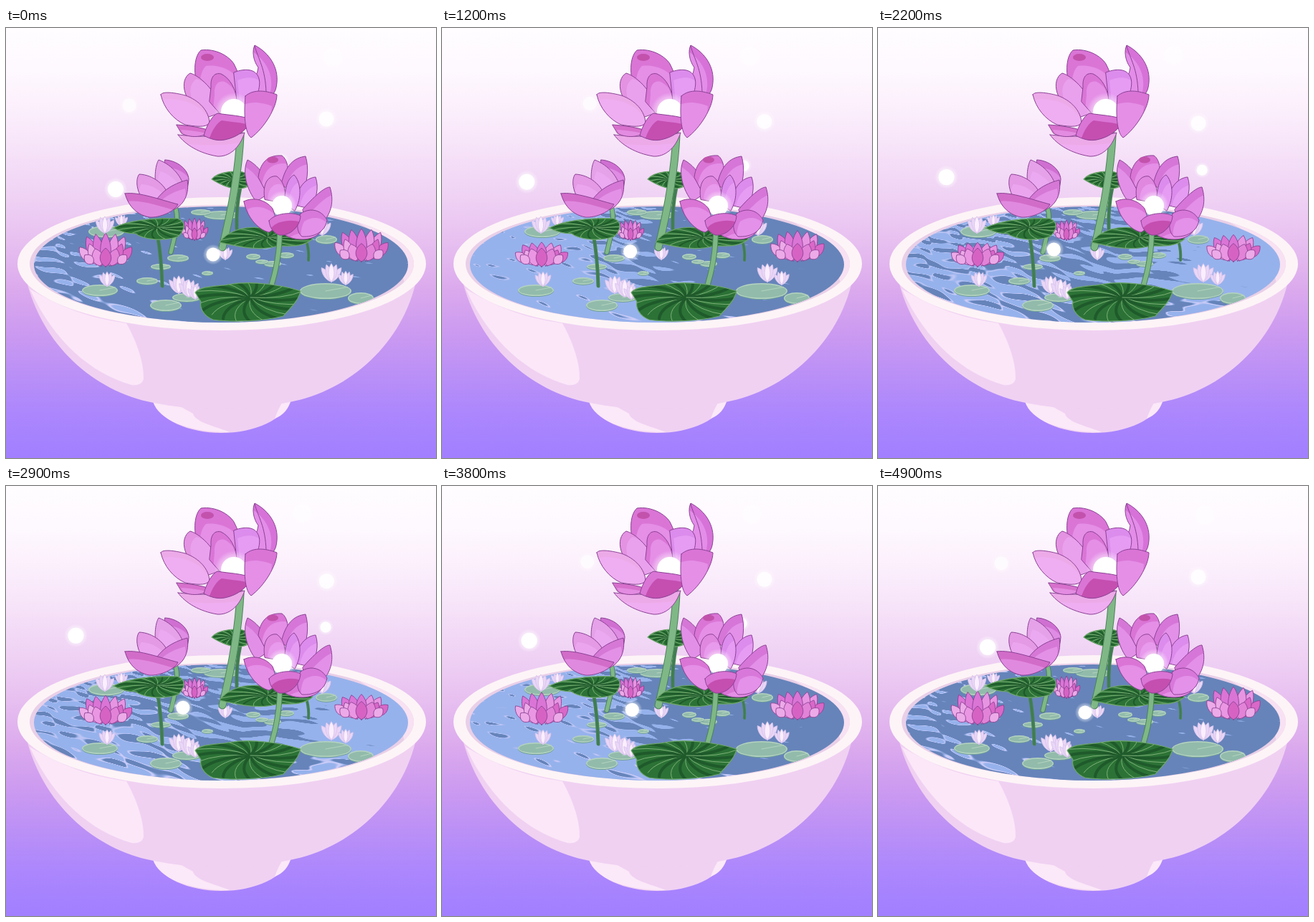
Recreate the animation shown at these times as an HTML page with a canvas. Size 600x600 px, loop 5 s.

```html
<!DOCTYPE html>
<html lang="en">
<head>
<meta charset="utf-8">
<title>Lotus bowl</title>
<style>
html, body { margin: 0; width: 100%; height: 100%; overflow: hidden; }
canvas { display: block; width: 100vw; height: 100vh; }
</style>
</head>
<body>
<canvas id="stage" width="600" height="600"></canvas>
<script>
const ctx = document.getElementById('stage').getContext('2d');
const LOOP = 5000, STEP = 100, HALF = 2450;
const INK = '#8b4294', LEAF = '#2c7236';
const PINK = '#da75d6', SOFT = '#ecaae8', VIOLET = '#dc8cec', DEEP = '#c44fb0';

const clamp = v => Math.max(0, Math.min(1, v));
const mix = (a, b, k) => a + (b - a) * k;

// Value at time t between [time, value] stops
function track(t, stops) {
  for (let i = 1; i < stops.length; i++) {
    const [t0, a] = stops[i - 1], [t1, b] = stops[i];
    if (t <= t1) return mix(a, b, (t - t0) / (t1 - t0));
  }
  return stops[stops.length - 1][1];
}

function fill(d, color, ink) {
  const path = new Path2D(d);
  ctx.fillStyle = color;
  ctx.fill(path);
  if (ink) {
    ctx.strokeStyle = ink;
    ctx.lineWidth = .9;
    ctx.stroke(path);
  }
}

function line(d, color, width) {
  ctx.strokeStyle = color;
  ctx.lineWidth = width;
  ctx.stroke(new Path2D(d));
}

function oval(x, y, rx, ry, color) {
  ctx.fillStyle = color;
  ctx.beginPath();
  ctx.ellipse(x, y, rx, ry, 0, 0, 7);
  ctx.fill();
}

function inside(path, draw) {
  ctx.save();
  ctx.clip(path);
  draw();
  ctx.restore();
}

// White ball with a faint halo
function orb(x, y, r, alpha = 1) {
  ctx.save();
  ctx.globalAlpha = alpha;
  const g = ctx.createRadialGradient(x, y, r, x, y, r * 1.5);
  g.addColorStop(0, 'rgba(255,255,255,.45)');
  g.addColorStop(1, 'rgba(255,255,255,0)');
  oval(x, y, r * 1.5, r * 1.5, g);
  oval(x, y, r, r, '#fff');
  ctx.restore();
}

// Two-tone petal: base colour with a second facet
function petal(color, d, dx = 5, dy = 11, shade = 'rgba(242,180,252,.42)') {
  const path = new Path2D(d);
  ctx.fillStyle = color;
  ctx.fill(path);
  inside(path, () => {
    ctx.translate(dx, dy);
    ctx.fillStyle = shade;
    ctx.fill(path);
  });
  ctx.strokeStyle = INK;
  ctx.lineWidth = 1;
  ctx.stroke(path);
}

function leaf(d, cx, cy, rx, ry) {
  const path = new Path2D(d);
  ctx.fillStyle = LEAF;
  ctx.fill(path);
  inside(path, () => {
    for (let i = 0; i < 24; i++) {
      const a = i * Math.PI / 12, b = a + .4;
      const x = cx + rx * Math.cos(a), y = cy + ry * Math.sin(a);
      const bend = `${cx + rx * .6 * Math.cos(b)} ${cy + ry * .6 * Math.sin(b)}`;
      line(`M${cx} ${cy}Q${bend} ${x} ${y}`, i % 2 ? '#86b87f' : '#1f5a2b', i % 2 ? .9 : ry * .12);
    }
  });
  ctx.strokeStyle = '#6ea66b';
  ctx.lineWidth = 1.2;
  ctx.stroke(path);
}

function stem(d, width, color = '#7fb886') {
  line(d, '#4b8459', width);
  line(d, color, width - 2);
}

function blade(x0, y0, x1, y1, r, color, ink) {
  const len = Math.hypot(x1 - x0, y1 - y0) || 1;
  const nx = (y0 - y1) / len * r, ny = (x1 - x0) / len * r;
  const at = (k, s) => `${mix(x0, x1, k) + nx * s} ${mix(y0, y1, k) + ny * s}`;
  fill(`M${x0} ${y0}C${at(.25, 1.5)} ${at(.75, 1.2)} ${x1} ${y1}C${at(.75, -1.2)} ${at(.25, -1.5)} ${x0} ${y0}Z`, color, ink);
}

// Small floating lotus; k is how far it stands out of the water
function lotus(x, y, w, h, k) {
  const row = (tips, high, spread, r, colors) => tips.forEach((u, i) => {
    const lift = h * .14 * u * u;
    blade(x + u * w * spread, y - lift, x + u * w * .5, y - h * high * (1 - .22 * u * u),
      w * r, colors[i % colors.length], INK);
  });
  row([-.72, .72, -.38, .38, 0], k, .2, .1, [PINK, '#e795e2']);
  row([-1, 1, -.62, .62], .74 * k, .28, .085, [SOFT, '#d968c8']);
  row([-.4, .42, 0], .55, .26, .105, ['#ea96e2', '#e283d8', '#d663c3']);
  row([-.8, .8], .4, .3, .085, [SOFT]);
}

function lily(x, y, s) {
  for (const u of [-.8, .8, -.4, .4, 0])
    blade(x, y, x + u * s * .75, y - s * (1.1 - u * u * .4), s * .17, u ? '#ead6f6' : '#fbeefd', '#d8c4ee');
}

function pad(x, y, rx, ry) {
  oval(x, y + 1, rx, ry, '#6f9f98');
  oval(x, y, rx, ry, '#b4d3bf');
  oval(x, y, rx - 1.5, ry - 1.5, '#92bbab');
  line(`M${x} ${y}L${x + rx * .85} ${y - ry * .5}`, '#b4d3bf', 1);
}

// Water: a thresholded ripple field in perspective; a tide of light crosses it
const W = 526, H = 166, LEFT = 37, TOP = 247;
const pool = document.createElement('canvas');
pool.width = W;
pool.height = H;
const pctx = pool.getContext('2d');
const pixels = pctx.createImageData(W, H);
const DARK = [102, 132, 186], LIGHT = [150, 178, 236], PALE = [206, 205, 248];
const tide = [
  [0, [-.1, -.55, -.85, -.95, -.95, -.95]],
  [800, [.35, .5, .1, -.9, -.95, -1.1]],
  [1200, [.85, .95, .05, -1, -1, -1.1]],
  [2000, [.4, .2, -.3, -.1, .95, 1.2]],
  [HALF, [.2, .1, -.3, .1, 1.1, 1.3]]
];

function paintWater(p) {
  const ph = p * .0013;
  const level = tide[0][1].map((_, i) => track(p, tide.map(([t, row]) => [t, row[i]])));
  for (let j = 0, n = 0; j < H; j++) {
    const y = j + TOP, depth = .55 + j / 170;
    const skew = Math.max(0, y - 330) * 1.3, far = Math.log(depth) * 62;
    for (let i = 0; i < W; i++, n += 4) {
      const x = i + LEFT, u = (x - 300) / depth * .05 - ph;
      const w = far - Math.min(x, 330) * .075;
      const wave = Math.sin(w + 1.5 * Math.sin(u + w * .3) + ph);
      const c = Math.max(0, Math.min(4.99, (i - skew) / W * 5 + .15 * wave)), f = c | 0;
      const v = mix(level[f], level[f + 1], c - f)
        + .4 * wave
        + .36 * Math.sin(w * 1.6 - u * 1.3 + 1.4 * Math.sin(u * 1.7 - w * .4))
        + .28 * Math.sin(u * 2.2 + w * .6 + ph * 2);
      const k = clamp(v * 9 + .5);
      const rim = clamp((290 - x) / 80) * .7 + clamp((y - 365) / 20);
      const shine = Math.min(1, rim) * Math.exp(-(((v - .12) / .07) ** 2));
      for (let q = 0; q < 3; q++)
        pixels.data[n + q] = mix(mix(DARK[q], LIGHT[q], k), PALE[q], shine);
      pixels.data[n + 3] = 255;
    }
  }
  pctx.putImageData(pixels, 0, 0);
}

const sky = ctx.createLinearGradient(0, 0, 0, 600);
['#fffdff', '#fef8ff', '#fbeefc', '#f5e0f8', '#efd1f4', '#e7bff0', '#dcabed', '#cd9bf0', '#bb90f6', '#ab86fd', '#a17fff']
  .forEach((c, i) => sky.addColorStop(i / 10, c));

function bowl() {
  fill('M203 515C211 548 257 565 300 565C347 565 390 547 398 515Z', '#f0d1f2');
  fill('M205 521C213 548 258 565 312 564C290 555 264 550 261 538L232 522Z', '#fbe8f8');
  fill('M398 518Q393 538 375 545Q380 530 388 519Z', '#fbe8f8');
  fill('M28 350C50 442 122 507 206 523Q300 542 396 522C480 506 554 440 573 350Z', '#f0d1f2');
  fill('M33 364C90 398 130 406 168 412C184 440 193 470 192 490Q189 500 175 498C120 482 68 440 33 364Z', '#fbe7f8');
  oval(301, 329, 285, 93, '#fdf4f7');
  oval(301, 329, 268, 82, '#e9cfe8');
  inside(new Path2D('M470 240H590V400H555Q570 300 470 262Z'), () => oval(301, 329, 268, 82, '#f8e1f2'));
}

function bigFlower() {
  petal(PINK, 'M266 78C261 56 264 38 272 31C292 28 311 39 318 50C329 70 331 95 328 112L290 112Z', 7, 22);
  oval(281, 41, 9, 5, '#c252ac');
  petal('#d672d8', 'M330 105C337 84 350 72 352 55C345 46 343 32 347 24C368 35 380 55 378 76C377 90 372 95 363 98Z', -8, 6);
  line('M347 25C352 44 362 56 363 90', INK, 1);
  petal(VIOLET, 'M318 62C330 57 345 56 351 66C360 80 345 110 335 116L322 100Z');
  petal('#e393e1', 'M282 124C246 107 241 72 257 63C274 68 296 93 302 117Z', 9, 8);
  petal(SOFT, 'M216 93C218 88 235 90 250 94C270 101 283 116 284 132C280 140 262 137 250 135C234 128 220 112 216 93Z', 3, 9);
  petal(PINK, 'M286 82C285 67 292 62 300 64C313 70 321 86 322 102L299 120L284 103Z');
  orb(318, 117, 18);
  petal(SOFT, 'M240 149C259 151 300 154 333 146C326 168 311 180 295 179C270 175 250 163 240 149Z', 6, 12);
  petal('#d770cc', 'M238 135C252 136 270 138 284 143C279 153 256 154 245 147Z', 6, 7);
  petal(PINK, 'M276 150C280 135 288 122 295 119C312 122 330 122 342 128C338 140 325 152 305 156C295 158 285 155 276 150Z', 6, 10, DEEP);
  petal(PINK, 'M334 95C346 84 365 88 378 93C378 111 360 140 342 153C335 148 331 128 334 95Z', -7, 16);
}

function midFlower() {
  petal('#d577d6', 'M349 242C336 226 329 201 337 184C350 190 364 207 370 228Z', -5, 9);
  petal(PINK, 'M352 208C355 185 368 177 385 178C394 184 396 202 389 218L365 232Z');
  oval(372, 184, 8, 4.5, '#c252ac');
  petal('#d676d8', 'M384 218C390 191 402 181 418 179C423 195 421 216 412 237Z');
  petal(VIOLET, 'M404 247C405 221 420 209 432 208C437 222 433 240 425 252Z');
  petal('#d676d8', 'M414 253C429 236 444 222 452 222C458 241 454 258 443 270L420 270Z');
  petal('#e088e0', 'M361 239C357 216 367 205 378 207C389 215 392 231 388 244Z');
  petal(VIOLET, 'M389 244C388 221 395 208 402 205C411 214 414 236 403 255Z');
  orb(385, 248, 14);
  petal(PINK, 'M332 242C345 235 363 240 372 252C379 268 376 281 367 285C350 281 335 261 332 242Z');
  petal(PINK, 'M385 286C400 272 424 270 440 283C430 299 399 298 385 286Z');
  petal('#d878da', 'M411 259C426 249 441 255 448 268C445 285 430 292 413 291C405 285 405 270 411 259Z');
  petal(PINK, 'M367 269C375 258 400 256 411 262C410 278 396 290 382 289C373 286 368 279 367 269Z', 3, 10, DEEP);
}

function leftFlower() {
  petal('#d06fd2', 'M222 184C239 185 254 197 255 211C254 229 245 243 235 250L215 240Z');
  petal('#e5a2e8', 'M211 235C206 211 208 192 213 184C232 191 247 209 248 224L234 246Z', 3, 16);
  petal('#e49ae4', 'M190 238C180 223 182 208 186 204C206 205 223 219 229 238Z', 3, 14);
  petal('#d678d6', 'M203 252C215 224 239 216 253 212C256 231 249 246 235 253Z', -3, 12);
  petal('#d26cc9', 'M166 231C185 228 216 240 240 246C235 256 215 265 200 264C180 260 170 246 166 231Z', 5, 11);
}

const pads = [
  [140, 284, 25, 8], [300, 261, 24, 6], [272, 257, 14, 4], [447, 295, 15, 6], [240, 321, 15, 5],
  [216, 333, 14, 4], [197, 353, 15, 5], [131, 366, 25, 8], [223, 387, 22, 8], [252, 376, 20, 6],
  [446, 367, 36, 11], [495, 377, 18, 8], [345, 319, 10, 4], [372, 329, 12, 4], [357, 326, 9, 3],
  [391, 317, 11, 4], [330, 287, 12, 4], [281, 342, 8, 3]
];
const lilies = [
  [138, 286, 21], [161, 276, 14], [141, 360, 18], [241, 370, 22], [255, 375, 22], [264, 378, 17],
  [454, 354, 23], [474, 358, 17], [441, 289, 20], [306, 323, 16]
];

function draw(t) {
  const p = t < HALF ? t : Math.max(0, 2 * HALF - t);
  // Part of a slow orbit, run forwards and then back
  const swing = q => Math.sin((q - 1000) / 1350 * Math.PI / 2);
  const e = (swing(p) - swing(0)) / (1 - swing(0));
  const fly = (x0, y0, x1, y1, r, a) => orb(mix(x0, x1, e), mix(y0, y1, e), r, a);
  ctx.lineJoin = ctx.lineCap = 'round';

  ctx.fillStyle = sky;
  ctx.fillRect(0, 0, 600, 600);
  fly(456, 41, 412, 38, 13, .35);
  fly(172, 108, 229, 104, 9.5, .6);
  orb(447 + 3 * Math.sin(Math.PI * e), mix(127, 133, e), 10.5, .8);
  orb(384 + .031 * p, 185 + .006 * p, 7.5, .95);
  fly(153, 225, 95, 208, 11);

  bowl();
  const surface = new Path2D();
  surface.ellipse(300, 330, 261, 81, 0, 0, 7);
  paintWater(p);
  inside(surface, () => {
    ctx.drawImage(pool, LEFT, TOP);
    pads.forEach(d => pad(...d));
  });

  lotus(263, 296, 37, 31, track(t, [[0, 1], [800, .92], [2500, .9], [3800, .96], [4900, 1]]));
  lotus(139, 333, 73, 47, track(t, [[0, 1], [800, .73], [2200, .72], [2900, .87], [3800, .96], [4900, 1]]));
  lotus(496, 326, 74, 46, track(t, [[0, 1], [800, .97], [1200, .94], [2200, .82], [2900, .77], [3800, .87], [4900, 1]]));
  lilies.forEach(d => lily(...d));

  stem('M327 222Q321 250 322 280', 5, '#3f7d50');
  leaf('M287 211C297 199 326 198 336 203L341 219C325 230 303 221 287 211Z', 316, 211, 30, 14);
  stem('M235 246C243 266 236 288 230 313', 7);
  leftFlower();
  stem('M211 287Q217 320 218 360', 5, '#3f7d50');
  leaf('M150 279C167 270 202 264 240 266C253 271 248 284 240 291C217 299 190 294 181 287Q165 287 150 279Z', 211, 278, 62, 19);
  stem('M327 150Q324 216 302 306', 11);
  stem('M420 300Q423 312 422 324', 4, '#3f7d50');
  leaf('M298 299C310 282 334 276 358 279C386 277 414 282 428 294C416 306 396 304 380 304C352 312 326 305 298 299Z', 365, 292, 70, 18);
  fly(289, 316, 245, 309, 9.5);
  bigFlower();
  stem('M382 280Q382 326 368 366', 8);
  midFlower();
  leaf('M264 369C273 359 295 361 310 358C345 352 386 359 411 367C408 382 394 393 387 402C360 409 317 411 289 407C276 402 270 391 272 382Z', 341, 376, 76, 34);
}

let last = -1;
function frame(now) {
  const t = Math.floor(now % LOOP / STEP) * STEP;
  if (t !== last) draw(last = t);
  requestAnimationFrame(frame);
}
draw(0);
requestAnimationFrame(frame);
</script>
</body>
</html>
```
